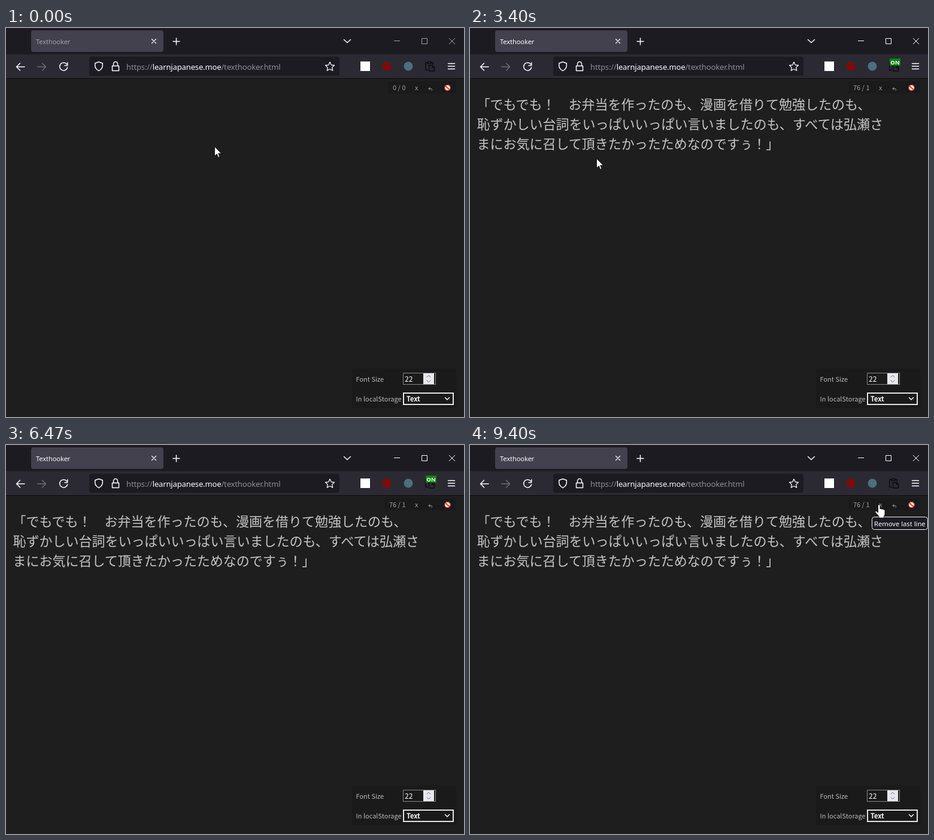
An HTML page that plays this animation: 765x651 px, repeating every 9790 ms.

```html
<!DOCTYPE html>
<html lang="ja">
<head>
<meta charset="utf-8">
<title>Texthooker</title>
<style>
  html, body { margin: 0; width: 100%; height: 100%; overflow: hidden; background: #1e1e1e; }
  svg { display: block; }
  text { font-family: "Noto Sans CJK JP", "Noto Sans CJK", sans-serif; text-spacing-trim: space-all; white-space: pre; }
  .ui { font-family: "Noto Sans", "Open Sans", sans-serif; }
  .arial { font-family: "Liberation Sans", Arial, sans-serif; }
  .bold { font-weight: 700; }
  .line { fill: none; stroke: #fbfbfe; stroke-width: 1.5; stroke-linecap: round; stroke-linejoin: round; }
  .thin { fill: none; stroke-width: 1; }
  #beam { mix-blend-mode: difference; }
</style>
</head>
<body>
<svg id="stage" width="765" height="651" viewBox="0 0 765 651" xmlns="http://www.w3.org/2000/svg"></svg>
<script>
const LOOP = 9790;
const stage = document.getElementById('stage');

const text = (x, y, size, str, fill = '#fff', attrs = '') =>
  `<text x="${x}" y="${y}" font-size="${size}" fill="${fill}" ${attrs}>${str}</text>`;
const rect = (x, y, w, h, fill, attrs = '') =>
  `<rect x="${x}" y="${y}" width="${w}" height="${h}" fill="${fill}" ${attrs}/>`;
const line = (d, attrs = '') => `<path class="line" d="${d}" ${attrs}/>`;
const group = (id, ...parts) => `<g id="${id}">${parts.join('')}</g>`;

// ---- Browser window ----
const browser = [
  rect(0, 0, 765, 44, '#1c1b22'),
  rect(42, 4, 221, 36, '#42414d', 'rx="4"'),
  line('M243.5 18.5l7 7m0-7l-7 7', 'style="stroke-width:1.2"'),
  line('M279 22.5h11m-5.5-5.5v11'),
  line('M564.5 19.5l5.5 5l5.5-5'),
  group('title',
    text(50, 27, 11.1, 'Texthooker', 'currentColor', 'class="ui" letter-spacing="-.1"'),
    '<path class="thin" stroke="currentColor" d="M648 21.5h10M694.5 17.5h9v9h-9zM740 17l10 10m0-10l-10 10"/>'),
  rect(0, 44, 765, 40, '#2b2a33'),
  rect(0, 84, 765, 1, '#0c0c0d'),
  line('M31 65H17.5m6-6l-6 6l6 6'),
  line('M53 65h13.5m-6-6l6 6l-6 6', 'style="stroke:#6f6e76"'),
  line('M101.5 60.5a6.6 6.6 0 1 0 1.2 5.5M102.7 58v4.7H98'),
  rect(139, 48, 418, 32, '#1c1b22', 'rx="4"'),
  line('M155 56.8l6.3 2.2v3.5q0 6-6.3 9.2q-6.3-3.2-6.3-9.2V59z'),
  line('M177.5 63.5h11v8h-11zM179.5 63v-3a3.5 3.5 0 0 1 7 0v3'),
  text(201, 70, 13,
    '<tspan>https://</tspan><tspan fill="#fbfbfe">learnjapanese.moe</tspan><tspan>/texthooker.html</tspan>',
    '#8f8e96', 'class="ui" letter-spacing="-.14"'),
  line('M541 57l2.3 4.8l5.2.7l-3.8 3.6l1 5.2l-4.7-2.5l-4.7 2.5l1-5.2l-3.8-3.6l5.2-.7z', 'style="stroke-width:1.3"'),
  rect(592, 56, 16, 16, '#fff'),
  '<circle cx="636" cy="64" r="7.5" fill="#800a0a"/><circle cx="672" cy="64" r="7.5" fill="#4c6f80"/>',
  line('M738.5 59.5h11m-11 4.5h11m-11 4.5h11'),
  rect(692, 48, 32, 32, '#52525e', 'id="hover" rx="4"'),
  line('M704 70.5h-3.2v-12.5h2.7m7 0h2.7v2.5M704 56.5h6v3h-6zM706.5 62.5h6l3 3v6.5h-9zM712 62.5v3.5h3.5',
    'style="stroke:#0c0c0f"'),
  group('badge', rect(701, 51, 18, 12, '#0b850f'),
    text(710, 60.5, 9.5, 'ON', '#fff', 'class="ui bold" text-anchor="middle"')),
];

// ---- Web page ----
const GREY = '#a0a0a0';
const page = [
  rect(0, 85, 765, 566, '#1e1e1e'),
  rect(638, 89, 114, 20, '#1a1a1a', 'id="counterBox"'),
  text(667.5, 104, 11, '0 / 0', GREY, 'id="counter" text-anchor="end"'),
  text(683, 104, 11, 'x', GREY),
  '<path class="thin" stroke="#a0a0a0" d="M706 101.5h4.5a2 2 0 0 1 0 3.5M708.5 99l-2.5 2.5l2.5 2.5"/>',
  '<circle cx="737.5" cy="100" r="4.7" fill="#f6ece8" stroke="#d9452b" stroke-width="1.3"/>',
  '<path d="M734 97l7 6.5" stroke="#d9452b" stroke-width="2"/>',
  rect(578, 570, 174, 66, '#1a1a1a'),
  text(584.5, 592, 11, 'Font Size', '#b8b8b8', 'font-weight="500"'),
  text(584.5, 625, 11, 'In localStorage', '#b8b8b8', 'font-weight="500"'),
  rect(663.5, 577.5, 54, 19, '#1a1a1a', 'stroke="#858585"'),
  text(666, 592, 12, '22'),
  rect(697, 578, 18, 18, '#e9e9ed'),
  '<path class="thin" stroke="#77777f" d="M702.5 584.5l3.5-3l3.5 3M702.5 589.5l3.5 3l3.5-3"/>',
  rect(664, 611, 83, 19, '#1a1a1a', 'stroke="#e3e3e3" stroke-width="2"'),
  text(669, 625, 11, 'Text', '#fff', 'font-weight="700"'),
  line('M733.5 618.5l3.5 3.5l3.5-3.5'),
];

const passage = [
  '「でもでも！　お弁当を作ったのも、漫画を借りて勉強したのも、',
  '恥ずかしい台詞をいっぱいいっぱい言いましたのも、すべては弘瀬さ',
  'まにお気に召して頂きたかったためなのですぅ！」',
];
const LEFT = 11.5;
const mark = (id, from, str) => {
  const x = LEFT + from * 22;
  return group(id,
    rect(Math.floor(x), 176, str.length * 22, 32, '#b0b0b0'), text(x, 202, 22, str));
};
const story = group('story',
  ...passage.map((s, i) => text(LEFT, 136 + 33 * i, 22, s, '#c6c6c6')),
  mark('markA', 5, '召して'),
  mark('markB', 8, '頂きたかった'),
  text(529.5, 202, 10, 'x', GREY, 'id="closeX"'));

// ---- Dictionary popup ----
const INK = '#dadada';
const pill = (x, y, w, fill, label) => rect(x, y, w, 31, fill, 'rx="4"') + label;
const dictPill = (y, w, name, num) =>
  text(22, y + 22, 21, num, '#7d7d7d', 'class="arial"') +
  pill(46, y, w, '#9455ae', text(54, y + 22, 16.8, name, '#fff', 'class="bold"'));
const rows = list => list.map((s, i) => text(46, 396 + 30 * i, 21, s, INK)).join('');

// Ruby is half the size of the headword and shares its centre.
function head(ruby, kanji, kana, note) {
  const width = Math.max(42, ruby.length * 21), mid = 16 + width / 2;
  return text(mid, 249, 21, ruby, INK, 'text-anchor="middle"') +
    text(mid, 291, 42, kanji, INK, 'text-anchor="middle"') +
    text(16 + width, 291, 42, kana, INK) +
    `<path d="M16 298.5h${width}" stroke="#8a8a8a" stroke-dasharray="1 3"/>` +
    text(68 + width, 290, 21, note, '#7d7d7d', 'class="arial"');
}
const pitch = (kana, num, d) =>
  text(226.5, 329, 21, `${kana} ${num}`, INK) +
  `<path d="${d}" fill="none" stroke="#fff" stroke-width="2"/>`;

const entryA = group('entryA',
  head('め', '召', 'す', '-te'),
  pitch('めす', '[1]', 'M226 309H251V318'),
  rows([
    'め・す【召す】（他五）《サ（ソ）・シ・ス・ス・セ・セ》',
    '① 「呼び寄せる」「取り寄せる」の尊敬語。召し寄せる。',
    '② 「食う」「飲む」「着る」などの尊敬語。「羽織を一」',
    '③ 「かぜをひく」「ふろにはいる」「年をとる」「気にいる」などの尊',
    '敬語。「お気に一」',
    '多く「お召しになる」の形で、また、「食べる」「飲む」の意味では',
    '「召しあがる」の形で使われる。',
  ]),
  dictPill(585.5, 188, '遠緑光国語辞典 第五版', '2.'),
  text(46, 640, 21, 'めす【召す】[1]:[1]', INK));

const entryB = group('entryB',
  head('いただ', '頂', 'く', '-tai « past'),
  pitch('いただく', '[0]', 'M247 309H310'),
  `<path d="M48 410.5h17v16h-17zM51 418.5h11" fill="none" stroke="${INK}" stroke-width="1.5"/>`,
  rows([
    'いただ・く【頂く・◇戴く】《カ（コ）・キ（イ）・ク・ク・ケ・ケ》',
    '　 （他五）',
    '① 頭にのせる。頭上に大事に持つ。「雪を一峰」「星を一・いて帰る',
    '（＝日没後に帰る）」「頭に霜を一（＝頭髪が白くなる年齢になる）」',
    '② 上の者としてむかえる。敬い仕える。「盟主に一」「先生を会長に',
    '一」',
    '③ 「もらう」の謙譲語。頂戴（ちようだい）する。「おみやげを一」',
    '④ 「食べる」「飲む」の謙譲語。転じて、丁寧語でも用いる。「お食事',
    'を一」',
    '⑤ 他人から物を（もらう）',
  ]));

const popup = group('popup',
  rect(0, 223, 765, 428, '#1e1e1e'),
  '<path d="M1 263l9.5 9l-9.5 9z" fill="#4a90e2"/>',
  '<path d="M710 247.5h5l7-5v19l-7-5h-5z" fill="#a5a5a0"/>',
  '<path d="M724.5 247.5q3.5 4.5 0 9M729.5 244.5q6 7.5 0 15" fill="none" stroke="#d8343a" stroke-width="2.5"/>',
  pill(16, 307, 195, '#6640be', text(24, 329, 16.5, 'Kanjium Pitch Accents', '#fff', 'class="arial bold"')),
  dictPill(341, 277, '柊原社国語辞典 第十一版 画像無し', '1.'),
  entryA, entryB,
  rect(750, 224, 15, 427, '#181818'),
  rect(750, 241, 14, 18, '#4d4d4d'),
  line('M754 234l3.5-3.5l3.5 3.5M754 641l3.5 3.5l3.5-3.5', 'style="stroke-width:2"'),
  rect(.5, 223.5, 764, 427, 'none', 'stroke="#6a6a6a"'));

// ---- Tooltips and pointers ----
const tip = (id, x, y, w, str) => group(id,
  rect(x + .5, y + .5, w - 1, 21, '#1c1b22', 'rx="4" stroke="#f0f0f4"'),
  text(x + 4, y + 15.5, 11.2, str, '#fbfbfe', 'class="ui"'));

const pointers = [
  tip('tipToggle', 625, 95, 140, 'Toggle clipboard inserter'),
  tip('tipRemove', 671, 120, 94, 'Remove last line'),
  '<path id="arrow" d="M.5.5V16.2L4.2 12.8L6.7 18.5L9 17.5L6.6 11.9H11.5Z" fill="#fff" stroke="#000" stroke-width=".8"/>',
  '<path id="beam" d="M-3.5-7.5H-1L.5-6.5L2-7.5H4M.5-6.5V6.5M-3.5 7.5H-1L.5 6.5L2 7.5H4" fill="none" stroke="#fff"/>',
  '<path id="hand" d="M-1.5 13V1.5a1.7 1.7 0 0 1 3.4 0V7q1.7-1.2 3 .4q1.7-.9 2.7.7q2.3-.5 2.4 1.6V15q0 3-1.7 4.5V22H0V19.5L-6 12.5q-.7-2.2 1.5-2z" fill="#fff" stroke="#000" stroke-width=".8"/>',
];

stage.innerHTML = [...browser, ...page, story, popup, ...pointers].join('');
const $ = id => document.getElementById(id);
const show = (id, on) => { $(id).style.display = on ? '' : 'none'; };

// ---- Motion: start, end, steps, then four Bezier points ----
const moves = [
  [70, 530, 8, [348, 198], [420, 185], [520, 140], [586, 118]],
  [730, 1330, 10, [586, 118], [650, 100], [760, 72], [710, 65]],
  [2400, 3330, 15, [710, 65], [600, 200], [300, 300], [214, 218]],
  [3400, 3400, 1, [214, 218], [214, 218], [211, 218], [211, 218]],
  [3800, 4330, 9, [211, 218], [200, 236], [85, 205], [127, 194]],
  [5130, 5730, 10, [127, 194], [150, 194], [180, 194], [200, 194]],
  [6870, 7470, 10, [200, 194], [260, 300], [600, 290], [703, 75]],
  [8670, 8800, 3, [703, 75], [698, 82], [688, 94], [683, 100]],
];

function pointerAt(t) {
  let [x, y] = moves[0][3];
  for (const [t0, t1, n, a, b, c, d] of moves) {
    if (t < t0) break;
    const gap = (t1 - t0) / (n - 1 || 1);
    const k = gap ? Math.min(n, Math.floor((t - t0 + 3) / gap) + 1) : n;
    const s = k / n, u = s * s * (3 - 2 * s), v = 1 - u;
    [x, y] = [0, 1].map(i =>
      Math.round(v * v * v * a[i] + 3 * v * v * u * b[i] + 3 * v * u * u * c[i] + u * u * u * d[i]));
  }
  return [x, y];
}

function draw(t) {
  const within = (a, b) => t >= a && t < b;
  const [x, y] = pointerAt(t);
  const filled = t >= 2000;

  $('title').style.color = t >= 1600 ? '#fbfbfe' : '#a3a2a8';
  show('hover', x >= 692 && x < 724 && y >= 48 && y < 80);
  $('hover').setAttribute('fill', within(1600, 1660) || within(8130, 8200) ? '#5b5b66' : '#52525e');
  show('badge', within(1730, 8270));

  show('story', filled);
  $('counter').textContent = filled ? '76 / 1' : '0 / 0';
  $('counterBox').setAttribute('x', filled ? 632 : 638);
  $('counterBox').setAttribute('width', filled ? 120 : 114);

  show('closeX', within(4330, 6470));
  show('popup', within(4470, 6470));
  for (const id of ['markA', 'entryA']) show(id, within(4470, 5730));
  for (const id of ['markB', 'entryB']) show(id, within(5730, 6470));
  show('tipToggle', within(8000, 8200));
  show('tipRemove', t >= 9400);

  const onText = filled && x > 12 && x < 690 && y > 112 && y < 210;
  const kind = t >= 8800 ? 'hand' : onText ? 'beam' : 'arrow';
  for (const id of ['arrow', 'beam', 'hand']) show(id, id === kind);
  $(kind).setAttribute('transform', `translate(${x} ${y})`);
}

const start = performance.now();
function tick() {
  draw((performance.now() - start) % LOOP);
  requestAnimationFrame(tick);
}
tick();
</script>
</body>
</html>
```
